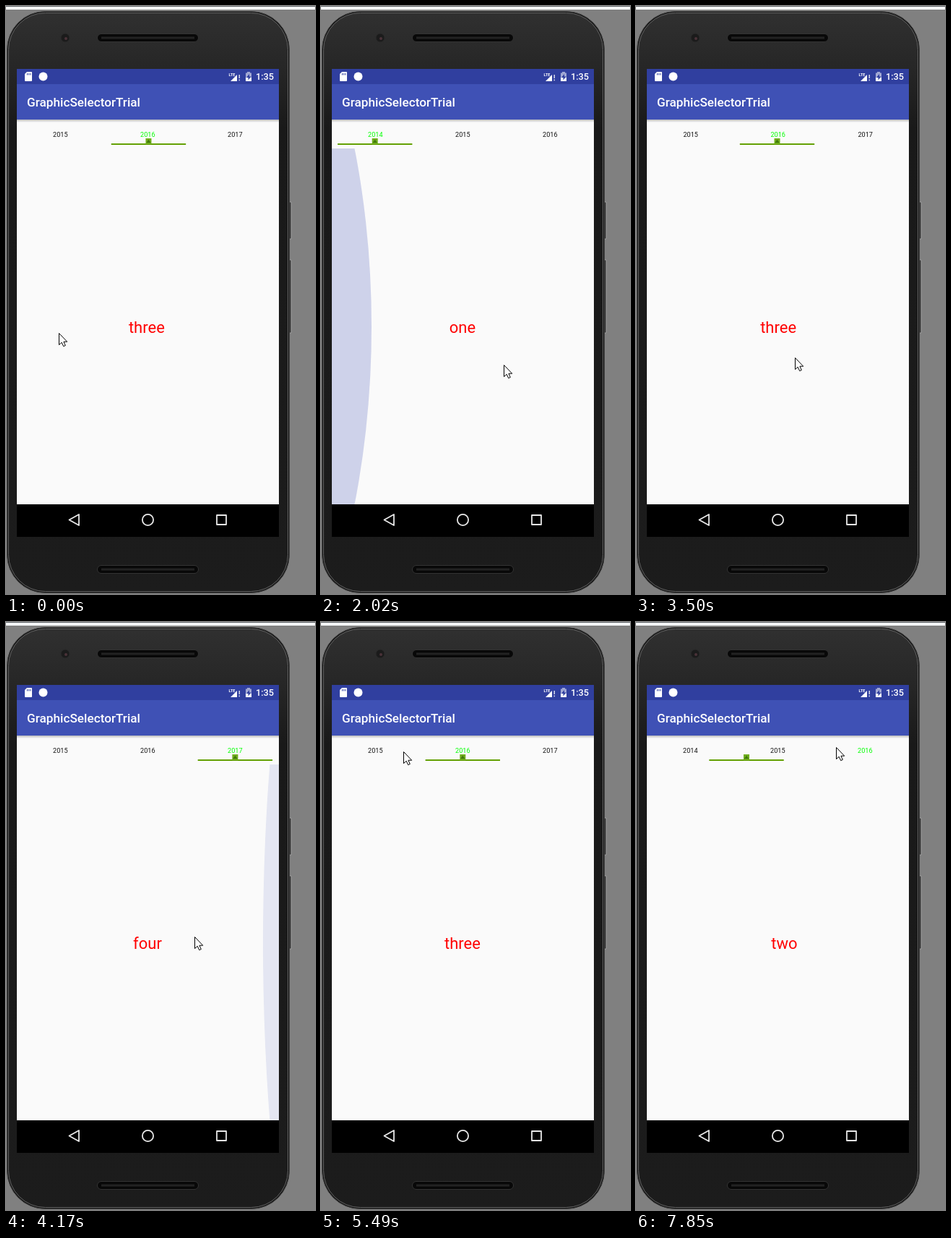
An HTML page for the animation above (8000 ms loop, 428 px wide and 813 px high).

```html
<!DOCTYPE html>
<html lang="en">
<head>
<meta charset="utf-8">
<style>
  html, body { margin: 0; width: 100%; height: 100%; overflow: hidden; background: #808080; }
  svg { display: block; font-family: Roboto, sans-serif; }
  .mid { text-anchor: middle; }
</style>
</head>
<body>
<svg width="428" height="813" viewBox="0 0 428 813">
  <defs>
    <linearGradient id="shell" x2="0" y2="1">
      <stop stop-color="#303030"/>
      <stop offset=".1" stop-color="#262626"/>
      <stop offset=".2" stop-color="#191919"/>
      <stop offset="1" stop-color="#1c1c1c"/>
    </linearGradient>
    <linearGradient id="shade" x2="0" y2="1">
      <stop stop-opacity=".25"/>
      <stop offset="1" stop-opacity="0"/>
    </linearGradient>
    <clipPath id="screen"><path d="M15 157H378V689H15Z"/></clipPath>
    <clipPath id="pager"><path d="M15 197H378V689H15Z"/></clipPath>
    <g id="speaker">
      <rect x="126.5" y=".5" width="140" height="11" rx="5.5" fill="#080808" stroke="#333"/>
      <path d="M132 6H261" stroke="#222" stroke-width="3"/>
    </g>
  </defs>

  <path d="M0 0H428V5H0Z" fill="#f4f6f7"/>
  <path d="M0 .5H428" stroke="#606468"/>
  <path d="M392 271h3v51h-3zM392 351h3v101h-3z" fill="#333" stroke="#aaa" stroke-width=".8"/>
  <rect x="1.5" y="7.5" width="391" height="804" rx="53" fill="#101010" stroke="#444"/>
  <rect x="3.5" y="9.5" width="387" height="800" rx="51" fill="url(#shell)" stroke="#777" stroke-width=".8"/>
  <use href="#speaker" y="38"/>
  <use href="#speaker" y="773"/>
  <circle cx="82" cy="44" r="6" fill="#1b1b1b" stroke="#2a2a2a"/>
  <circle cx="83" cy="45" r="2" fill="#4a3238"/>

  <path d="M15 87H378V108H15Z" fill="#303f9f"/>
  <path d="M15 108H378V157H15Z" fill="#3f51b5"/>
  <path d="M15 157H378V689H15Z" fill="#fafafa"/>
  <path d="M15 157H378V161H15Z" fill="url(#shade)"/>
  <path d="M15 689H378V734H15Z"/>

  <g fill="#fff">
    <path d="M29 91h6q1 0 1 1v11q0 1-1 1h-8q-1 0-1-1v-9z"/>
    <path d="M29.5 93v2.5M31.7 93v2.5M33.9 93v2.5" stroke="#303f9f"/>
    <circle cx="51.5" cy="97.5" r="6"/>
    <text x="308.5" y="96.5" font-size="5.5" font-weight="700">LTE</text>
    <path d="M311 104L320 95V104Z"/>
    <path d="M322.5 95h1.5v5h-1.5zM322.5 101.5h1.5v1.7h-1.5z" opacity=".8"/>
    <path d="M332 92.5h2V91h4v1.5h2V104h-8z" opacity=".55"/>
    <path d="M332 99h8v5h-8z"/>
    <path d="M337 94l-4 5h2.5v3.5l4-5H337z" fill="#303f9f"/>
    <text x="346" y="102" font-size="12.7" font-weight="500">1:35</text>
    <text x="29" y="139" font-size="17.2" font-weight="500">GraphicSelectorTrial</text>
  </g>
  <g fill="none" stroke="#e8e8e8" stroke-width="1.8" stroke-linejoin="round">
    <path d="M87.5 710.5L101 703V718Z"/>
    <circle cx="196.5" cy="710.5" r="7.6"/>
    <path d="M292 704h13v13h-13z"/>
  </g>

  <g clip-path="url(#screen)">
    <g id="labels" class="mid" font-size="9.1"></g>
    <g id="indicator" fill="#63a004">
      <path d="M-51.7 190h103.4v2h-103.4z"/>
      <path d="M-4 183h8v8h-8z" fill="#6fae1c"/>
      <path d="M0 184.5L3 189H-3Z" fill="#41780c"/>
    </g>
    <g id="words" class="mid" font-size="22" fill="#f00"></g>
  </g>
  <g clip-path="url(#pager)"><ellipse id="glow" cy="443" ry="738" fill="#3f51b5"/></g>
  <path id="cursor" d="M.5 .5V16.5L4.2 13.2L6.7 18.6L9.3 17.4L6.9 12.2H11.7Z" fill="#fff" stroke="#000"/>
</svg>

<script>
const LOOP = 8000, STEPS = 60;
const PAGE = 363, TAB = 121;
const $ = id => document.getElementById(id);
const clamp = v => Math.max(0, Math.min(1, v));

const swipe = (at, to) => ({ at, to, ease: u => u * u * (3 - 2 * u), length: 4 });
const tap = (at, to) => ({ at, to, ease: u => 1 - (1 - u) ** 5, length: 2 });
const moves = [
  swipe(-3.87, 2), swipe(1, 1), swipe(4.5, 0), swipe(18, 1), swipe(22.13, 2), swipe(27, 3),
  tap(39, 2), tap(45.7, 1), tap(52.6, 0), tap(58.75, 2)
];
const pageAt = step => moves.reduce(
  (page, m) => page + (m.to - page) * m.ease(clamp((step - m.at) / m.length)), 3);

// Overscroll pulls: positive at the left edge, negative at the right.
const pulls = [{ peak: 10, size: 63 }, { peak: 15, size: 55 }, { peak: 32, size: -44 }];
const glowAt = step => pulls.reduce((sum, { peak, size }) =>
  sum + size * clamp(1 - (step < peak ? (peak - step) / 2 : (step - peak) / 4)), 0);

// Resting points of the pointer; an odd "sweeps" makes it go back and forth on the way there.
const stops = [
  { at: 0, x: 73, y: 452 },
  { at: 10, x: 278, y: 479, sweeps: 5 },
  { at: 13, x: 100, y: 490 },
  { at: 15, x: 253, y: 496 },
  { at: 18, x: 300, y: 497 },
  { at: 24, x: 110, y: 488, sweeps: 3 },
  { at: 26, x: 220, y: 486 },
  { at: 28, x: 280, y: 478 },
  { at: 32, x: 150, y: 420, sweeps: 3 },
  { at: 34, x: 209, y: 264 },
  { at: 37, x: 208, y: 168 },
  { at: 42, x: 104, y: 182 },
  { at: 44, x: 104, y: 182 },
  { at: 46, x: 80, y: 174 },
  { at: 53, x: 80, y: 174 },
  { at: 57, x: 288, y: 172 },
  { at: 59, x: 277, y: 173 }
];
function cursorAt(step) {
  const i = Math.max(1, stops.findIndex(s => s.at >= step));
  const a = stops[i - 1], b = stops[i];
  const u = (step - a.at) / (b.at - a.at);
  const swing = (1 - Math.cos(Math.PI * (b.sweeps || 1) * u)) / 2;
  return [a.x + (b.x - a.x) * swing, a.y + (b.y - a.y) * u].map(Math.round);
}

function addTexts(id, y, strings) {
  return strings.map(s => {
    const el = document.createElementNS('http://www.w3.org/2000/svg', 'text');
    el.textContent = s;
    el.setAttribute('y', y);
    return $(id).appendChild(el);
  });
}
const labels = addTexts('labels', 180.5, ['2014', '2015', '2016', '2017']);
const words = addTexts('words', 452, ['one', 'two', 'three', 'four']);

function draw(now) {
  const step = Math.floor((now + 20) % LOOP / LOOP * STEPS);
  const page = pageAt(step);
  const marker = pageAt(step - .1); // the marker trails the page slightly
  const selected = moves.filter(m => m.at <= step).pop().to;
  const scroll = TAB * clamp(page - 1);
  const pull = glowAt(step), depth = Math.abs(pull);

  labels.forEach((el, i) => {
    el.setAttribute('x', 75.3 + TAB * i - scroll);
    el.setAttribute('fill', i === selected ? '#0f0' : '#111');
  });
  words.forEach((el, i) => el.setAttribute('x', 196 + PAGE * (i - page)));
  $('indicator').setAttribute('transform', `translate(${74.7 + 121.3 * marker - scroll})`);

  // A tall circle squeezed sideways so that it reaches "depth" into the page.
  $('glow').setAttribute('cx', (pull < 0 ? 378 : 15) - 6.464 * pull);
  $('glow').setAttribute('rx', 7.464 * depth);
  $('glow').setAttribute('opacity', Math.min(.235, depth * .0053));
  $('cursor').setAttribute('transform', `translate(${cursorAt(step)})`);
}

const start = performance.now();
function tick() {
  draw(performance.now() - start);
  requestAnimationFrame(tick);
}
tick();
</script>
</body>
</html>
```
